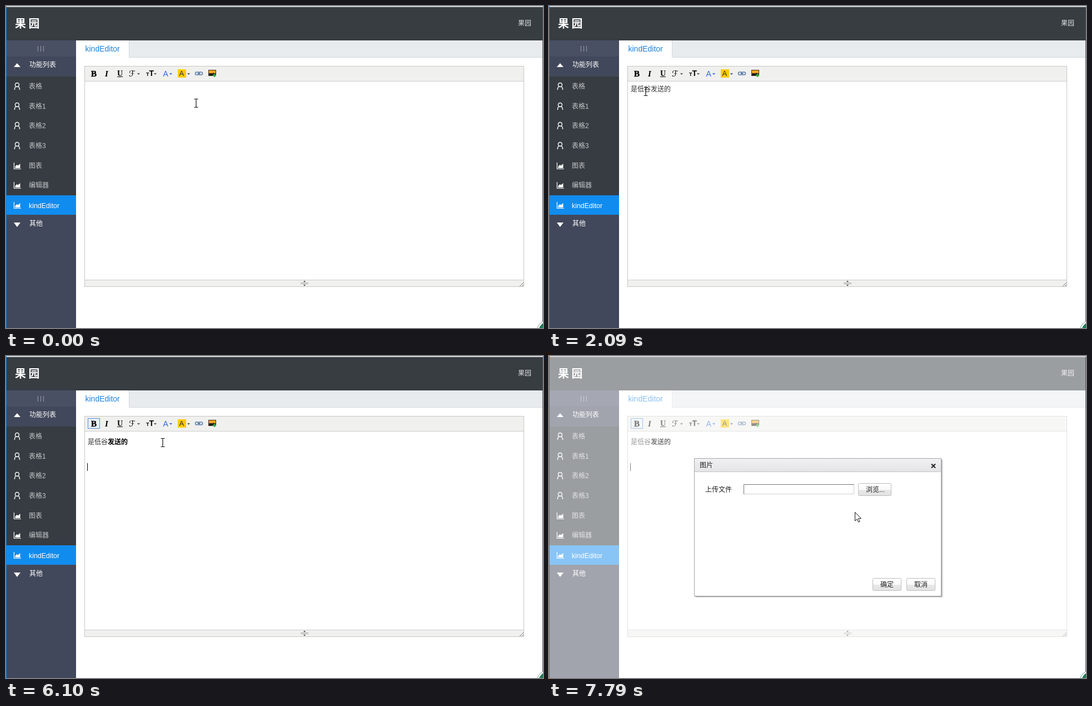
These frames come from a looping animation (966 by 580 pixels, 8000 ms). An HTML page:

```html
<!DOCTYPE html>
<html lang="zh">
<head>
<meta charset="utf-8">
<title>kindEditor</title>
<style>
  html, body { margin: 0; width: 100%; height: 100%; overflow: hidden; background: #fff; }
  svg { display: block; width: 966px; height: 580px; }
  text { font-family: 'Liberation Sans', 'Noto Sans CJK SC', 'Noto Sans CJK', sans-serif; white-space: pre; }
  .serif { font-family: 'Liberation Serif', 'Noto Serif', serif; }
  .script { font-family: 'DejaVu Sans', 'DejaVu Serif', sans-serif; }
  .mono { font-family: 'Liberation Mono', monospace; }
  .thin { font-weight: 300; }
  .bold { font-weight: bold; }
</style>
</head>
<body>
<svg id="stage" viewBox="0 0 966 580"></svg>
<script>
const LOOP = 8000;

const rect = (x, y, w, h, fill, more = '') =>
  `<rect x="${x}" y="${y}" width="${w}" height="${h}" fill="${fill}" ${more}/>`;
const frame = (x, y, w, h, fill, stroke, more = '') =>
  rect(x + .5, y + .5, w - 1, h - 1, fill, `stroke="${stroke}" ${more}`);
const path = (d, fill, stroke = 'none', more = '') =>
  `<path d="${d}" fill="${fill}" stroke="${stroke}" ${more}/>`;
// Text placed by its left edge and vertical middle.
const label = (x, middle, size, fill, text, more = '') =>
  `<text x="${x}" y="${middle + size * .37}" font-size="${size}" fill="${fill}" ${more}>${text}</text>`;
const move = (x, y, content) => `<g transform="translate(${x} ${y})">${content}</g>`;
const group = (id, content) => `<g id="${id}">${content}</g>`;
const dropArrow = (x, fill) => path(`M${x} 121h5l-2.5 3z`, fill);

const userIcon = y => move(20, y,
  '<circle cy="-3" r="3.5" fill="none" stroke="#fff" stroke-width="1.4"/>' +
  path('M-2 0Q-4.6 1.5-4.6 6M2 0Q4.6 1.5 4.6 6', 'none', '#fff', 'stroke-width="1.4"'));
const chartIcon = y => move(14, y - 6,
  path('M.5 0V11.5H13', 'none', '#fff', 'stroke-width="1.2"') +
  path('M2.5 10V7L5.5 4L7.5 5.5L11.5 2V10z', '#fff'));

function sidebar() {
  const items = ['表格', '表格1', '表格2', '表格3', '图表', '编辑器', 'kindEditor'];
  const rows = items.map((name, i) => {
    const y = Math.round(145 + i * 35.65), last = i === 6;
    return (last ? rect(1, 341, 125, 35, '#108cee') : '') +
      (i < 4 ? userIcon(y) : chartIcon(y)) +
      label(41, y, last ? 12.4 : 12, last ? '#fff' : '#c3c5c8', name);
  });
  return rect(1, 62, 125, 518, '#42485b') + rect(1, 62, 125, 29, '#4a5064') +
    path('M57.5 72v10M62.5 72v10M67.5 72v10', 'none', '#9a9eaa') +
    path('M14 110h12l-6-7z', '#fff') + label(42, 106, 12, '#fff', '功能列表') +
    rect(1, 127, 125, 214, '#363c41') + rows.join('') +
    path('M14 390h12l-6 8z', '#fff') + label(42, 392, 12, '#fff', '其他');
}

function page() {
  return rect(0, 0, 966, 580, '#fff') + rect(0, 0, 966, 2, '#d3d6d8') +
    rect(1, 2, 964, 60, '#373d41') +
    label(16, 32, 20, '#fff', '果园', 'class="bold" letter-spacing="4.5"') +
    label(921, 31, 12, '#dcdee0', '果园') +
    sidebar() +
    rect(126, 62, 839, 31, '#e7ebee') + rect(126, 92, 839, 1, '#d3d7da') +
    rect(126, 62, 95, 31, '#fff') + rect(221, 62, 1, 31, '#d3d7da') +
    label(142.5, 77, 14, '#1a82dc', 'kindEditor') +
    frame(141, 108, 791, 398, '#fff', '#c6c6c6') +
    rect(142, 109, 789, 26, '#f0f0ee') + rect(142, 135, 789, 1, '#ccc') +
    rect(142, 493, 789, 12, '#f0f0ee') + rect(142, 493, 789, 1, '#ccc') +
    path('M530 498.5h14M530 500.5h14', 'none', '#aaa') +
    path('M535 497h4l-2-2.5zM535 502h4l-2 2.5z', '#444') +
    path('M924 505l7-7M928 505l3-3', 'none', '#777');
}

const toolHover = x => frame(x, 112, 22, 19, '#e9eff6', '#5690d2');

function toolbar() {
  const serif = 'class="serif bold"';
  return label(153, 121, 15, '#000', 'B', 'class="serif bold" stroke="#000" stroke-width=".5"') +
    label(178, 121, 15, '#000', 'I', serif + ' font-style="italic"') +
    label(200, 120.5, 14, '#000', 'U', serif) + rect(200, 127, 10, 1, '#000') +
    label(221, 121, 15, '#000', 'ℱ', 'class="script"') + dropArrow(236, '#555') +
    label(252, 122.5, 9, '#000', 'T', 'class="bold"') +
    label(257.5, 121, 14, '#000', 'T', 'class="bold"') + dropArrow(266, '#555') +
    label(282.5, 121.5, 14, '#2b67e0', 'A') + dropArrow(294, '#2b67e0') +
    rect(309, 114, 15, 15, '#fc0') + label(311.5, 121.5, 13, '#222', 'A') + dropArrow(326, '#555') +
    '<g fill="none" stroke="#5b7fae" stroke-width="1.5">' +
    '<rect x="340.5" y="119" width="7" height="5" rx="2.5"/><rect x="346.5" y="119" width="7" height="5" rx="2.5"/></g>' +
    rect(344, 121, 6, 1, '#3c5f90') +
    rect(364, 115, 14, 11, '#3d3020') + rect(365, 116, 12, 5, '#f5a623') +
    path('M365 125l3-4 3 2 2-3 4 5z', '#1d1a18') +
    path('M372 125h6M375 122v6', 'none', '#2fa83a', 'stroke-width="2.4"');
}

function inputPopup(x, y, typed, words) {
  const blue = '#1681d2', edge = '#b3cfe8';
  let left = x + 11, list = '';
  words.forEach((word, i) => {
    const badge = word.endsWith('*'), name = word.replace('*', ''), fill = i ? blue : '#e01f1f';
    const end = left + 16 + 16 * name.length;
    list += label(left, y + 41, 13.33, fill, i + 1 + '.', 'class="mono"') +
      label(left + 16, y + 40, 16, fill, name, 'class="thin"');
    if (badge) list += `<circle cx="${end + 5}" cy="${y + 38}" r="4.6" fill="none" stroke="${blue}"/>`;
    left = end + (badge ? 10 : 0) + 12.3;
  });
  const right = Math.round(left), width = right + 60 - x;
  const typedEnd = x + 11 + [...typed].reduce((sum, c) => sum + (c === "'" ? 3.8 : c === 'f' ? 5.33 : c === 's' ? 8.9 : 9.78), 0);
  return frame(x, y, width, 55, '#fff', '#a9c0d4') +
    label(x + 10, y + 14, 16, '#0f62b8', typed, 'class="bold"') +
    rect(Math.round(typedEnd), y + 5, 1, 18, '#e01f1f') +
    rect(x + 11, y + 26, width - 42, 1, '#d3dde6') + list +
    frame(right, y + 33, 15, 15, '#fff', edge) + frame(right + 14, y + 33, 15, 15, '#fff', edge) +
    frame(right + 37, y + 33, 15, 15, '#fff', edge) +
    path(`M${right + 9} ${y + 37}v7l-4-3.5z`, '#b5d3ec') +
    path(`M${right + 20} ${y + 37}v7l4-3.5z`, blue) +
    path(`M${right + 41} ${y + 39}h8l-4 4z`, blue) +
    rect(x + width - 29, y + 1, 28, 28, '#f5a07c');
}

const button = (x, y, w, text, tx) =>
  frame(x, y, w, 23, 'url(#button)', '#bdbdbd', 'rx="2"') + label(tx, y + 11.5, 12, '#222', text);

function dialog() {
  return rect(1, 2, 964, 578, '#fff', 'opacity=".5"') +
    rect(264, 187, 445, 248, '#888', 'opacity=".25"') + rect(263, 186, 444, 248, '#777', 'opacity=".55"') +
    frame(261, 184, 445, 249, '#fff', '#a3a3ab') +
    rect(262, 185, 443, 23, 'url(#title)') + rect(262, 208, 443, 1, '#c4c4c8') +
    label(271, 197, 12, '#222', '图片') +
    path('M688 194.5l7 7m0-7l-7 7', 'none', '#222', 'stroke-width="2"') +
    label(281, 241, 12, '#222', '上传文件') +
    frame(350, 231, 199, 18, '#fff', '#d0d0d0') + path('M350.5 249V231.5H549', 'none', '#777') +
    button(556, 229, 60, '浏览...', 570) +
    button(582, 400, 52, '确定', 596) + button(643, 400, 52, '取消', 657);
}

const shapes = {
  beam: path('M-3.5-7.5h3l.5.5.5-.5h3M-3.5 7.5h3l.5-.5.5.5h3M0-7V7', 'none', '#111', 'stroke-width="1.2"'),
  arrow: path('M.5.5V16l3.6-3.4 2.6 5.6 2.4-1.1-2.6-5.4h5z', '#fff', '#111'),
  hand: path('M-1 2Q-1 .5.5.5T2 2V8.5Q4 7 5 9Q7 8 8 10Q11 9.5 11 12V16L9 19.5V22.5H0V19.5L-6.5 12.5Q-6.5 10-4 10.5L-1 13.5z',
    '#fff', '#111', 'stroke-width="1.1"') + path('M2 8.5v3M5 9.5v2.5M8 10.5v2', 'none', '#111')
};

// time, shape, x, y
const pointer = [
  [0, 'beam', 342, 175], [120, 'beam', 331, 181], [240, 'beam', 317, 189],
  [1460, 'beam', 304, 180], [1580, 'beam', 268, 166], [1700, 'beam', 238, 158],
  [1850, 'beam', 214, 156], [1970, 'beam', 190, 153], [2090, 'beam', 174, 154],
  [2520, 'beam', 229, 160], [2670, 'beam', 224, 159], [2790, 'beam', 214, 158],
  [2910, 'beam', 204, 156], [3030, 'beam', 193, 155], [3150, 'beam', 185, 154],
  [3300, 'arrow', 162, 134], [3460, 'hand', 161, 130], [3610, 'hand', 160, 130],
  [3760, 'hand', 160, 129], [3880, 'hand', 163, 131], [4000, 'beam', 201, 152],
  [4120, 'beam', 242, 162], [4240, 'beam', 260, 164],
  [6100, 'beam', 282, 156], [6220, 'beam', 325, 143], [6340, 'arrow', 369, 122],
  [6460, 'arrow', 395, 111], [6610, 'arrow', 389, 112], [6730, 'hand', 384, 115],
  [6850, 'hand', 381, 115], [7160, 'arrow', 381, 115], [7300, 'arrow', 394, 126],
  [7420, 'arrow', 407, 137], [7670, 'arrow', 485, 214], [7790, 'arrow', 550, 281]
];
// time, x, y; without a place the caret is hidden
const caret = [
  [0], [120, 146, 143], [850, 150, 143], [1210, 218, 143], [1700], [2240, 218, 143], [2670],
  [4490, 218, 143], [5020], [5450, 146, 170], [5700, 146, 193], [6220], [6730, 146, 193],
  [7160], [7670, 146, 193]
];
const selection = [[0, 218], [2790, 206], [3030, 194], [3150, 182], [4490, 218]];
const tail = ['水电工', '收到过', '傻大个', '三等功', '圣诞歌', '扫地杆', '闪电狗'];
const popups = [
  [0, ''],
  [700, inputPopup(245, 322, 's', [...'是说上三岁时谁四'].concat('算'))],
  [850, inputPopup(151, 163, "s'd'g", ['十多个', '山谷*', ...tail])],
  [970, inputPopup(151, 163, "s'd'g'f", ['是低谷发', '十多个', ...tail])],
  [1090, inputPopup(151, 163, "s'd'g'f's'd", ['是低谷发送的', '十多个*', ...tail])],
  [1210, '']
];

function writing(time) {
  if (time < 1210) return time >= 850 ? rect(148, 155, 2, 1, '#333') : '';
  const y = time < 5450 ? 150 : 155, start = at(selection, time)[1];
  const bold = time >= 3760 ? 'class="bold"' : '';
  const marked = (218 - start) / 12, words = '发送的';
  return label(147, y, 12, '#333', '是低谷') + rect(start, 143, 218 - start, 14, '#3390ff') +
    label(183, y, 12, bold ? '#000' : '#333', words.slice(0, 3 - marked), bold) +
    label(start + 1, y, 12, '#fff', words.slice(3 - marked), bold);
}

const at = (table, time) => table.findLast(row => row[0] <= time);

const stage = document.getElementById('stage');
stage.innerHTML = `<defs>
  <linearGradient id="title" x2="0" y2="1"><stop stop-color="#f1f1f3"/><stop offset="1" stop-color="#e4e4e6"/></linearGradient>
  <linearGradient id="button" x2="0" y2="1"><stop stop-color="#fff"/><stop offset=".5" stop-color="#fafafa"/>
  <stop offset=".55" stop-color="#e8e8e8"/><stop offset="1" stop-color="#e2e2e2"/></linearGradient></defs>` +
  page() + group('hovers', '') + toolbar() + group('doc', '') + group('popup', '') +
  group('modal', dialog()) +
  rect(0, 0, 1, 580, '#1883d7') + rect(965, 2, 1, 578, '#50565c') +
  '<circle cx="975" cy="586" r="20" fill="#fff" stroke="#8b9490"/><circle cx="975" cy="586" r="17" fill="#1d7a56"/>' +
  group('pointer', '');

const part = id => document.getElementById(id);
const shown = {};
function put(id, content) {
  if (shown[id] !== content) part(id).innerHTML = shown[id] = content;
}

function draw(time) {
  const [, shape, x, y] = at(pointer, time);
  const [, caretX, caretY] = at(caret, time);
  put('hovers', (time >= 3460 ? toolHover(147) : '') + (time >= 6730 && time < 7300 ? toolHover(360) : ''));
  put('doc', writing(time) + (caretX ? rect(caretX, caretY, 1, 14, '#000') : ''));
  put('popup', at(popups, time)[1]);
  put('pointer', move(x, y, shapes[shape]));
  part('modal').style.display = time >= 7160 ? '' : 'none';
}

const began = performance.now();
function tick() {
  draw((performance.now() - began) % LOOP);
  requestAnimationFrame(tick);
}
tick();
</script>
</body>
</html>
```
